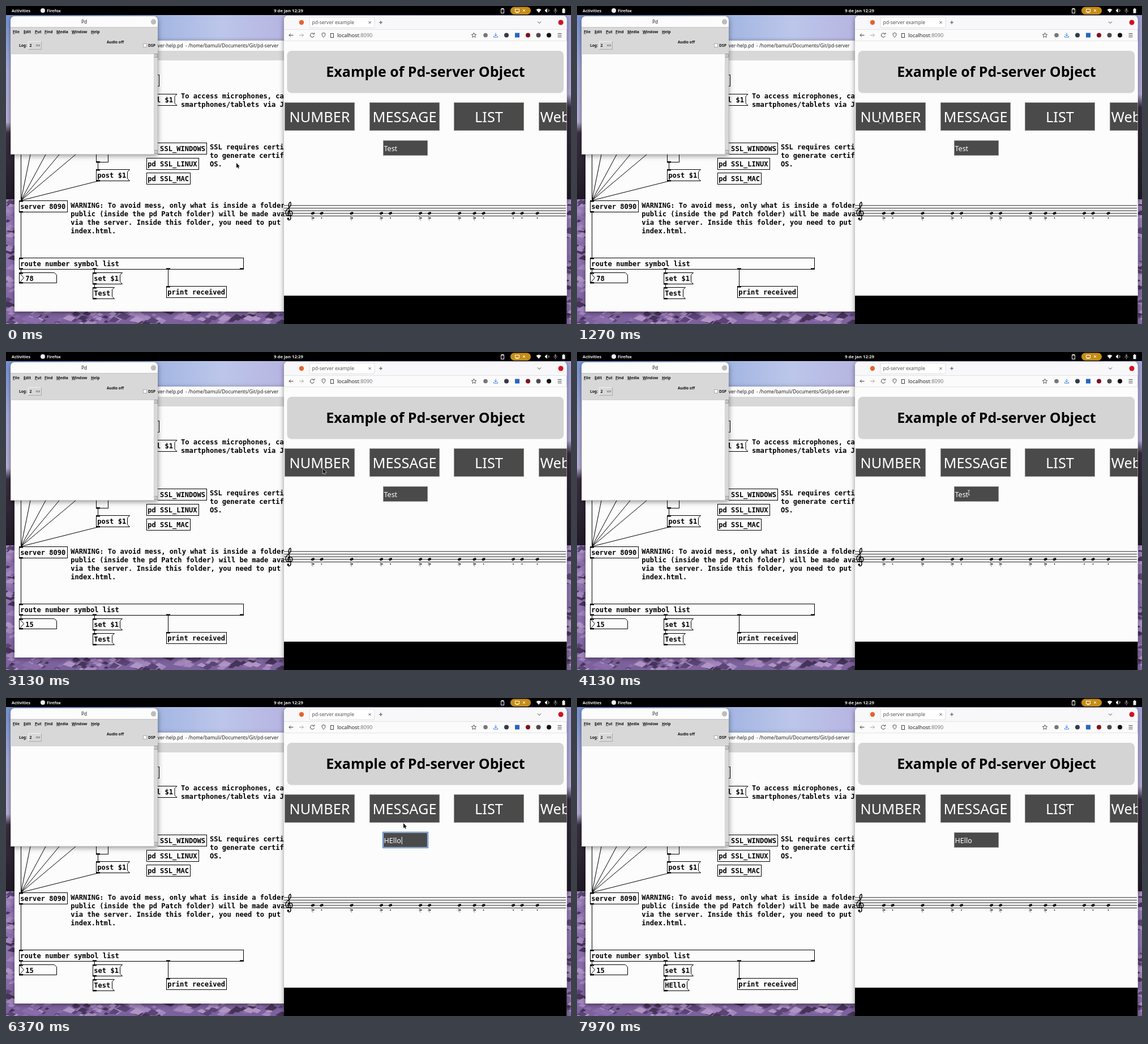
These frames come from a looping animation (998 px wide and 561 px high, 8000 ms). An HTML page with a canvas:

```html
<!DOCTYPE html>
<html lang="en">
<head>
<meta charset="utf-8">
<title>Pd-server demo</title>
<style>
html, body { margin: 0; width: 100%; height: 100%; overflow: hidden; background: #000; }
canvas { display: block; width: 998px; height: 561px; }
</style>
</head>
<body>
<canvas id="stage" width="998" height="561"></canvas>
<script>
const W = 998, H = 561, LOOP = 8000;
const screenCtx = document.getElementById('stage').getContext('2d');
const backdrop = document.createElement('canvas');
backdrop.width = W;
backdrop.height = H;
let g = backdrop.getContext('2d');

const SANS = '"Noto Sans", "Open Sans", sans-serif';
const MONO = 'bold 12.09px "DejaVu Sans Mono", monospace';
const CHAR = 7.277;

function rect(x, y, w, h, color) {
  g.fillStyle = color;
  g.fillRect(x, y, w, h);
}
function round(x, y, w, h, r, color) {
  g.fillStyle = color;
  g.beginPath();
  g.roundRect(x, y, w, h, r);
  g.fill();
}
function frame(x, y, w, h, color = '#000') {
  g.strokeStyle = color;
  g.lineWidth = 1;
  g.strokeRect(x + .5, y + .5, w, h);
}
function dot(x, y, r, color) {
  g.fillStyle = color;
  g.beginPath();
  g.arc(x, y, r, 0, Math.PI * 2);
  g.fill();
}
function path(points, color = '#000', width = 1, close = false) {
  g.strokeStyle = color;
  g.lineWidth = width;
  g.beginPath();
  points.forEach(([x, y]) => g.lineTo(x, y));
  if (close) g.closePath();
  g.stroke();
}
function arc(x, y, r, from, to, color, width = 1) {
  g.strokeStyle = color;
  g.lineWidth = width;
  g.beginPath();
  g.arc(x, y, r, from, to);
  g.stroke();
}
function text(str, x, y, font, color = '#111', align = 'left') {
  g.font = font;
  g.fillStyle = color;
  g.textAlign = align;
  g.fillText(str, x, y);
}
const sans = (size, weight = '') => `${weight} ${size}px ${SANS}`;
const mono = (str, x, y) => text(str, x, y, MONO, '#000');
function gradient(x, y, w, h, vertical, stops) {
  const fill = g.createLinearGradient(x, y, vertical ? x : x + w, vertical ? y + h : y);
  stops.forEach(([at, color]) => fill.addColorStop(at, color));
  rect(x, y, w, h, fill);
}
function clipped(x, y, w, h, draw) {
  g.save();
  g.beginPath();
  g.rect(x, y, w, h);
  g.clip();
  draw();
  g.restore();
}
function shadowed(blur, draw) {
  g.save();
  g.shadowColor = 'rgba(0,0,0,.45)';
  g.shadowBlur = blur;
  g.shadowOffsetY = 2;
  draw();
  g.restore();
}
function random(seed) {
  return () => (seed = (seed * 16807) % 2147483647) / 2147483647;
}

function rocks(x, y, w, h, count, rnd) {
  const tones = ['#8a6cab', '#a386bd', '#5a4575', '#453458', '#b094c4'];
  clipped(x, y, w, h, () => {
    for (let i = 0; i < count; i++) {
      const cx = x + rnd() * w, cy = y + rnd() * h, size = 4 + rnd() * 9;
      g.fillStyle = tones[i % tones.length];
      g.beginPath();
      g.moveTo(cx - size, cy + rnd() * 4);
      g.lineTo(cx, cy - size * .5);
      g.lineTo(cx + size, cy);
      g.lineTo(cx + size * .3, cy + size * .5);
      g.fill();
    }
  });
}

function wallpaper() {
  gradient(0, 16, W, 100, false,
    [[0, '#6f8fd2'], [.27, '#a3b6e2'], [.38, '#bcc6ea'], [.49, '#b7b5e2'], [1, '#b0abdc']]);
  gradient(0, 16, 16, 325, true,
    [[0, '#7693d3'], [.3, '#a9aedd'], [.58, '#b9b0d8'], [.64, '#3a2d40'], [1, '#1f1925']]);
  gradient(990, 16, 8, 325, true,
    [[0, '#a3a4d8'], [.43, '#b5aad6'], [.5, '#362b3d'], [1, '#1f1925']]);
  const rnd = random(41);
  gradient(0, 341, W, 220, true, [[0, '#9b7fb9'], [.6, '#8a6eab'], [1, '#7b619b']]);
  rocks(0, 341, 16, 198, 40, rnd);
  rocks(990, 341, 8, 220, 40, rnd);
  rocks(0, 538, 492, 23, 110, rnd);
}

function topBar() {
  rect(0, 0, W, 16, '#000');
  text('Activities', 10, 10.7, sans(7.1, 'bold'), '#eee');
  dot(65, 8, 4, '#eee');
  text('Firefox', 72, 10.7, sans(7.2, 'bold'), '#eee');
  text('9 de jan 12:29', 499, 10.7, sans(7.7, 'bold'), '#eee', 'center');
  frame(874, 5, 5, 7, '#eee');
  rect(875, 4, 4, 2, '#eee');
  round(891, 1.5, 36, 13.5, 6.7, '#c58d16');
  frame(899, 5, 7, 5, '#fff');
  rect(901, 11, 4, 1, '#fff');
  path([[913, 6], [917, 10]], '#fff');
  path([[917, 6], [913, 10]], '#fff');
  g.fillStyle = '#eee';
  g.beginPath();
  g.moveTo(941, 12);
  g.lineTo(936.5, 6.5);
  g.quadraticCurveTo(941, 3, 945.5, 6.5);
  g.fill();
  rect(952, 6.5, 2, 3, '#eee');
  g.beginPath();
  g.moveTo(953, 7); g.lineTo(956, 4); g.lineTo(956, 12); g.lineTo(953, 9);
  g.fill();
  arc(956, 8, 3, -.8, .8, '#eee');
  round(969, 4, 3, 5, 1.5, '#777');
  arc(970.5, 7.5, 3, 0, Math.PI, '#777');
  rect(970, 10, 1, 3, '#777');
  rect(982.5, 5, 5, 7.5, '#eee');
  rect(984, 4, 2, 1, '#eee');
}

const inlet = (x, y) => rect(x, y, 7, 2.5, '#000');
function objectBox(str, x, y, w = Math.round(str.length * CHAR + 4.5)) {
  frame(x, y - 1, w, 20);
  mono(str, x + 2.3, y + 14);
}
function messageBox(str, x, y) {
  const l = x + .5, t = y - .5, r = l + Math.round(str.length * CHAR + 8.5);
  path([[l, t], [r, t], [r - 4, t + 4], [r - 4, t + 16], [r, t + 20], [l, t + 20]], '#000', 1, true);
  mono(str, x + 2.3, y + 14);
  inlet(x, y - 1);
  inlet(x, y + 18);
}

function patchWindow() {
  shadowed(8, () => round(15, 61, 485, 478, [7, 7, 0, 0], '#fcfcfc'));
  rect(15, 79, 476, 17, '#d8d8d8');
  text('server-help.pd  - /home/bamuli/Documents/Git/pd-server', 481.5, 73, sans(8.4), '#222', 'right');

  frame(200, 121, 70, 20);
  path([[250, 155.5], [302, 155.5], [298, 159.5], [298, 171.5], [302, 175.5], [250, 175.5]]);
  mono('l $1', 266, 170);
  mono('To access microphones, ca', 309, 163);
  mono('smartphones/tablets via J', 309, 178);
  objectBox('pd SSL_WINDOWS', 248, 242);
  objectBox('pd SSL_LINUX', 248, 269);
  objectBox('pd SSL_MAC', 248, 295);
  ['SSL requires certi', 'to generate certif', 'OS.']
    .forEach((line, i) => mono(line, 360, 253 + i * 15));

  frame(159, 250, 21, 25);
  inlet(159, 274);
  path([[162.5, 276], [162.5, 289]]);
  messageBox('post $1', 159, 289);
  [26.5, 43, 70, 94, 123].forEach(x => path([[x, 262], [26.5, 343]]));
  path([[162, 309], [26.5, 343]]);

  objectBox('server 8090', 23, 344);
  inlet(23, 343);
  inlet(23, 362);
  path([[26.5, 364], [26.5, 445]]);
  ['WARNING: To avoid mess, only what is inside a folder',
    'public (inside the pd Patch folder) will be made ava',
    'via the server. Inside this folder, you need to put',
    'index.html.'].forEach((line, i) => mono(line, 114.3, 356 + i * 15));

  objectBox('route number symbol list', 23, 445, 396);
  inlet(23, 444);
  [23, 153, 283, 413].forEach(x => inlet(x, 462.5));
  path([[26.5, 464], [26.5, 471]]);
  path([[156.5, 464], [156.5, 471]]);
  path([[156.5, 490], [156.5, 497]]);
  path([[286.5, 464], [286.5, 495]]);

  path([[23.5, 470.5], [85.5, 470.5], [89.5, 474.5], [89.5, 488.5], [23.5, 488.5]], '#000', 1, true);
  path([[23.5, 470.5], [31.5, 479.5], [23.5, 488.5]]);
  inlet(23, 470);
  inlet(23, 487);
  messageBox('set $1', 153, 471);
  objectBox('print received', 283, 495);
  inlet(283, 494);
}

function consoleWindow() {
  shadowed(10, () => round(8, 18, 260, 244, [7, 7, 0, 0], '#fcfcfc'));
  rect(8, 38, 260, 46, '#d8d8d8');
  rect(8, 37, 260, 1, '#c4c4c4');
  text('Pd', 138, 31, sans(8.3), '#222', 'center');
  dot(260.5, 28, 4.7, '#bdbdbd');
  const ui = sans(6.8, 'bold');
  const items = { File: 12, Edit: 31, Put: 51, Find: 68, Media: 89, Window: 116, Help: 150 };
  for (const [name, x] of Object.entries(items)) {
    text(name, x, 47.5, ui);
    rect(x, 48.5, g.measureText(name[0]).width, .8, '#333');
  }
  text('Log:', 23, 72, sans(6.6, 'bold'));
  frame(39, 62, 23, 14, '#aaa');
  path([[39.5, 76], [39.5, 62.5], [62, 62.5]], '#f4f4f4');
  text('2', 41.5, 72, ui);
  frame(53, 68, 6, 2, '#888');
  text('Audio off', 178, 66, sans(6.6, 'bold'));
  rect(242, 66, 7, 7, '#fff');
  frame(242, 66, 6, 6, '#aaa');
  text('DSP', 251, 72, ui);
  rect(261, 84, 7, 178, '#c6c6c6');
  rect(262, 91, 5, 163, '#d9d9d9');
  frame(261, 84, 6, 6, '#999');
  frame(261, 254, 6, 6, '#999');
  frame(8, 84, 253, 177, '#d0d0d0');
}

function browserChrome() {
  shadowed(9, () => round(491, 17, 499.5, 560, [7, 7, 0, 0], '#fbfbfc'));
  round(491, 17, 499.5, 24, [7, 7, 0, 0], '#f8f8fa');
  const ink = '#444';
  dot(522, 29, 4.2, '#e8622c');
  round(536, 19.5, 115, 19, 3, '#fff');
  g.strokeStyle = '#dedee2';
  g.stroke();
  text('pd-server example', 540.5, 32, sans(8.5), '#555');
  path([[640.5, 27], [644.5, 31]], ink, .9);
  path([[644.5, 27], [640.5, 31]], ink, .9);
  path([[659, 29], [665, 29]], ink);
  path([[662, 26], [662, 32]], ink);
  path([[939, 27.5], [942, 30.5], [945, 27.5]], ink);
  dot(980, 29, 4.5, '#d4101c');
  rect(491, 41, 499, 1, '#e2e2e5');

  path([[507.5, 51.5], [500, 51.5]], ink);
  path([[503, 48.5], [500, 51.5], [503, 54.5]], ink);
  path([[518, 51.5], [525.5, 51.5]], '#aaa');
  path([[522.5, 48.5], [525.5, 51.5], [522.5, 54.5]], '#aaa');
  arc(541, 51.5, 3.5, .3, 5.4, ink);
  path([[545, 47], [544.5, 49.5], [542, 49.5]], ink);
  path([[558, 48.5], [561, 47.3], [564, 48.5], [563.5, 52.5], [561, 55.3], [558.5, 52.5]], ink, .9, true);
  frame(573, 48, 5, 7, ink);
  text('localhost', 585, 55, sans(9.2), '#222');
  text(':8090', 585 + g.measureText('localhost').width, 55, sans(9.2), '#777');
  const star = [];
  for (let i = 0; i < 10; i++) {
    const a = i * Math.PI / 5 - Math.PI / 2, r = i % 2 ? 2 : 4.5;
    star.push([826.5 + r * Math.cos(a), 51.7 + r * Math.sin(a)]);
  }
  path(star, ink, .9, true);

  dot(847, 51.5, 3.8, '#777');
  path([[865, 47.5], [865, 53]], '#2f7de0');
  path([[862.5, 50.5], [865, 53], [867.5, 50.5]], '#2f7de0');
  path([[861.5, 53], [861.5, 55], [868.5, 55], [868.5, 53]], '#2f7de0');
  dot(884, 51.5, 4, '#333b48');
  rect(899, 47.5, 8, 8, '#2964c4');
  dot(922, 51.5, 4, '#7d1220');
  dot(940.5, 51.5, 4, '#4a4a4a');
  dot(959, 51.5, 4, '#111');
  [48.5, 51.5, 54.5].forEach(y => path([[974.5, y], [981.5, y]], ink));
}

function clef() {
  g.strokeStyle = '#000';
  g.lineWidth = 1.4;
  g.lineCap = 'round';
  g.beginPath();
  g.moveTo(500, 363);
  g.bezierCurveTo(496, 366, 498.5, 370, 501.5, 370);
  g.bezierCurveTo(507, 370, 507.5, 361.5, 501.5, 361.5);
  g.bezierCurveTo(497.5, 361.5, 497, 366, 499.5, 367);
  g.moveTo(501.5, 370);
  g.bezierCurveTo(493, 372, 492, 362, 497.5, 358);
  g.bezierCurveTo(503, 354, 504.5, 350, 502.5, 346);
  g.bezierCurveTo(498, 347, 499, 353, 500, 358);
  g.lineTo(503, 373);
  g.bezierCurveTo(503.5, 378, 499, 378.5, 497.5, 376);
  g.stroke();
  g.lineCap = 'butt';
  dot(498.3, 375, 1.7, '#000');
}

function score() {
  for (let i = 0; i < 5; i++) rect(491, 351.5 + i * 4.6, 498, 1, '#222');
  clef();
  const accented = [542, 610.5, 663, 732, 748, 801, 827.5];
  const plain = [557.5, 679, 843.5, 896, 911.5, 938.5];
  for (const x of [...accented, ...plain]) {
    g.fillStyle = '#000';
    g.beginPath();
    g.ellipse(x, 365.7, 3.2, 2.2, -.35, 0, Math.PI * 2);
    g.fill();
  }
  accented.forEach(x => path([[x - 2.5, 372.5], [x + 2.5, 374], [x - 2.5, 375.5]], '#000', .9));
  accented.forEach(x => dot(x, 377.3, .6, '#000'));
  plain.forEach(x => dot(x, 374, .9, '#000'));
}

function page() {
  rect(491, 62, 499.5, 449, '#fcfcfc');
  rect(491, 61, 499.5, 1, '#e4e4e6');
  rect(491, 511, 499.5, 50, '#000');
  round(496.5, 79, 488.5, 74.5, 8, '#d4d4d4');
  text('Example of Pd-server Object', 741, 125, sans(25, 'bold'), '#000', 'center');
  clipped(491, 160, 499.5, 70, () => {
    ['NUMBER', 'MESSAGE', 'LIST', 'Web'].forEach((label, i) => {
      const x = 492 + Math.round(i * 149.7);
      rect(x, 170, 124, 50, '#4a4a4a');
      frame(x, 170, 123, 49, '#8a8a85');
      if (i < 3) text(label, x + 62, 205, sans(25.3), '#fff', 'center');
      else text(label, x + 2.5, 205, sans(25.3), '#fff');
    });
  });
  score();
}

wallpaper();
patchWindow();
consoleWindow();
browserChrome();
page();
topBar();
g = screenCtx;

// Pointer stops: time, x, y
const ROUTE = [
  [0, 407, 277], [100, 410, 277], [530, 503, 265], [1200, 534, 198], [2900, 534, 198],
  [3800, 692, 247], [4400, 692, 249], [6050, 692, 249], [6370, 702, 221],
  [6650, 704, 198], [7150, 704, 198], [7800, 862, 189], [8000, 862, 189]
];
const KEYS = [4700, 4950, 5220, 5450, 5900];
const FOCUS = 4400, SEND = 6850;

function pointerAt(t) {
  const i = Math.max(1, ROUTE.findIndex(stop => stop[0] > t));
  const [t0, x0, y0] = ROUTE[i - 1], [t1, x1, y1] = ROUTE[i];
  const p = (t - t0) / (t1 - t0), e = p * p * (3 - 2 * p);
  return [x0 + (x1 - x0) * e, y0 + (y1 - y0) * e];
}

function field(t) {
  const typed = KEYS.filter(k => k <= t).length;
  const value = typed ? 'HEllo'.slice(0, typed) : 'Test';
  const focused = t >= FOCUS && t < SEND;
  rect(666, 237, 79, 27, '#4a4a4a');
  frame(666, 237, 78, 26, '#8a8a85');
  if (focused) {
    frame(666, 237, 78, 26, '#c9d6e8');
    frame(665, 236, 80, 28, '#2f74c8');
  }
  text(value, 667.5, 255.5, sans(12.5), '#fff');
  if (!focused) return;
  const since = t - Math.max(FOCUS, ...KEYS.filter(k => k <= t));
  if (since % 1000 < 500) rect(668.5 + g.measureText(value).width, 245, 1, 13, '#fff');
}

function pointer(x, y) {
  if (x > 666 && x < 745 && y > 237 && y < 264) {
    path([[x - 2, y - 4.5], [x, y - 3.5], [x + 2, y - 4.5]], '#ddd');
    path([[x, y - 4], [x, y + 4]], '#ddd');
    path([[x - 2, y + 4.5], [x, y + 3.5], [x + 2, y + 4.5]], '#ddd');
    return;
  }
  g.beginPath();
  [[0, 0], [0, 8.5], [1.9, 6.8], [3.2, 9.6], [4.6, 9], [3.4, 6.2], [5.8, 6]]
    .forEach(([dx, dy]) => g.lineTo(x + dx, y + dy));
  g.closePath();
  g.strokeStyle = '#ddd';
  g.lineWidth = 1.2;
  g.stroke();
  g.fillStyle = '#111';
  g.fill();
}

function draw(t) {
  g.drawImage(backdrop, 0, 0);
  mono(t < 1500 ? '78' : t < 2600 ? '65' : '15', 34.3, 485);
  messageBox(t < SEND ? 'Test' : 'HEllo', 153, 497);
  field(t);
  pointer(...pointerAt(t));
}

const start = performance.now();
function tick() {
  draw((performance.now() - start) % LOOP);
  requestAnimationFrame(tick);
}
tick();
</script>
</body>
</html>
```
